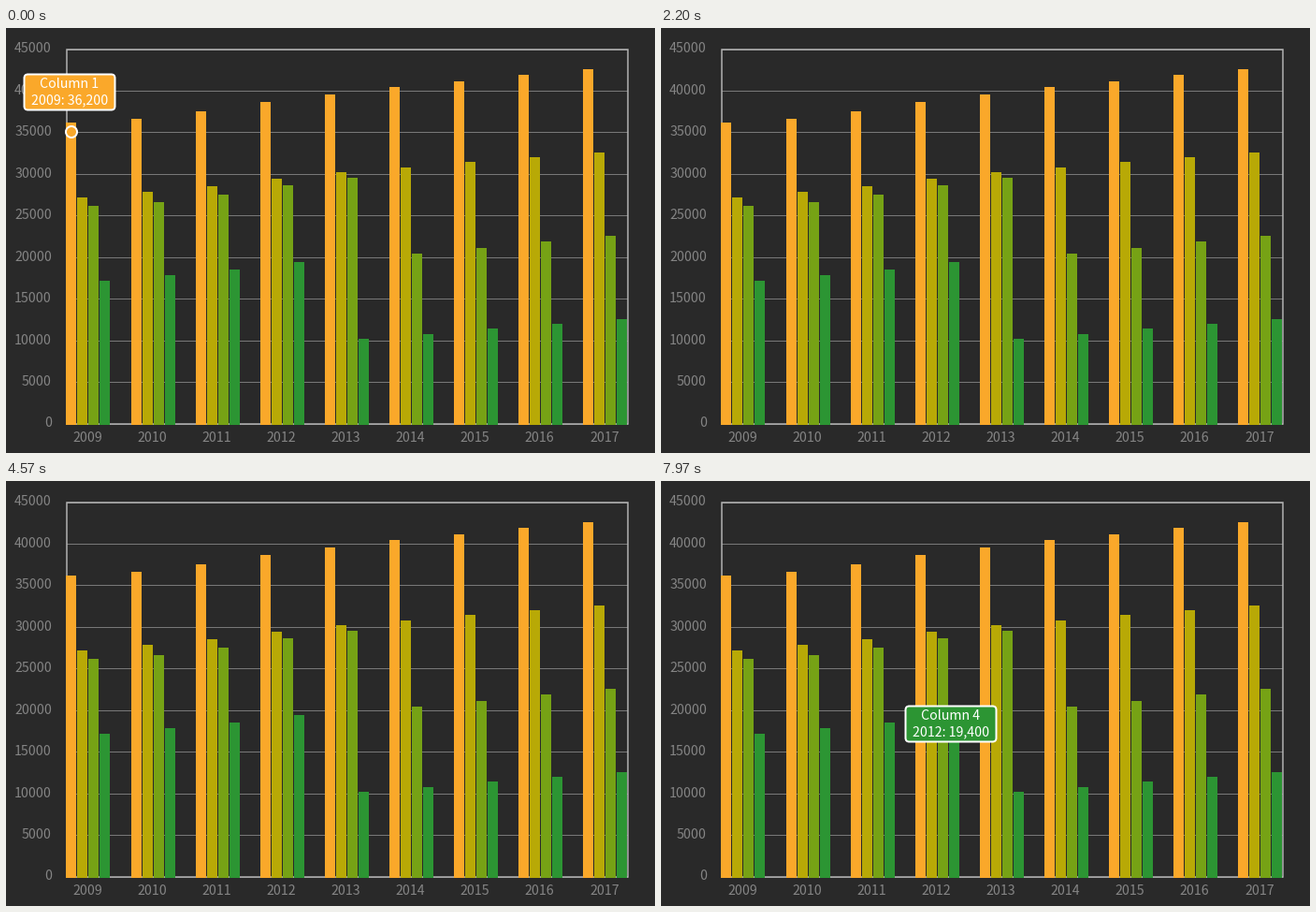
Recreate the animation shown at these times as a matplotlib script. Size 694x454 px, loop 8000 ms.

```python
import matplotlib.pyplot as plt
import numpy as np
from matplotlib.animation import FuncAnimation
from matplotlib.patches import Circle, FancyBboxPatch, Rectangle

W, H, DPI = 694, 454, 100
PX = 72 / DPI                      # points per pixel
FRAMES, INTERVAL = 250, 32

plt.rcParams["font.family"] = "Noto Sans CJK JP"
FONT = 14.2 * PX

LEFT, RIGHT, TOP, BOTTOM, Y_MAX = 65, 665, 23, 423, 45000
BAR_W, BAR_STEP, GROUP_STEP = 11, 12, 69
FIRST_YEAR, YEARS = 2009, 9
COLORS = ["#faa82a", "#b8a906", "#76a215", "#2c9533"]

# In hundreds: first value, and the year index from which 100 is lost
BASES = [362, 272, 262, 172]
DROPS = [YEARS, YEARS, 5, 4]

# Pointer moves: start ms, end ms, goal x, goal y; it rests in between
START = np.array([64, 106])
MOVES = [
    (300, 1200, 81, 182), (1200, 2000, 87, 225),
    (2030, 2210, 102, 250), (2210, 2450, 110, 290), (2450, 2900, 138, 230),
    (3600, 3870, 165, 247),
    (4070, 4150, 167, 251), (4150, 4300, 179, 274), (4300, 4570, 203, 289),
    (4900, 5200, 213, 298),
    (5650, 5675, 215, 298), (5675, 5870, 219, 287),
    (6500, 6830, 248, 284), (6830, 7260, 271, 282), (7260, 7500, 300, 293),
    (7800, 7960, 317, 297),
]


def value_of(c, i):
    if c % 2 == 0:
        growth = np.interp(i, [0, 1, 2, 3, 5, 8], [0, 4, 13, 24, 42, 64])
    else:
        growth = np.interp(i, [0, 2, 4, 8], [0, 13, 30, 54])
    return 100 * (BASES[c] + round(growth) - 100 * (i >= DROPS[c]))


def y_of(value):
    return BOTTOM - value * (BOTTOM - TOP) / Y_MAX


def bar_x(c, i):
    return LEFT + GROUP_STEP * i - (i == 0) + BAR_STEP * c


def pointer(t):
    pos = START
    for start, end, *goal in MOVES:
        k = np.clip((t - start) / (end - start), 0, 1)
        pos = pos + k * (np.array(goal) - pos)
    return pos


def bar_at(x, y):
    for i in range(YEARS):
        for c in range(len(COLORS)):
            if 0 <= x - bar_x(c, i) < BAR_STEP and y >= y_of(value_of(c, i)):
                return c, i
    return None


fig = plt.figure(figsize=(W / DPI, H / DPI), dpi=DPI, facecolor="#292929")
ax = fig.add_axes([0, 0, 1, 1])
ax.set(xlim=(0, W), ylim=(H, 0))
ax.axis("off")


def label(x, y, text, color, ha="center", z=2):
    return ax.text(x, y, text, color=color, fontsize=FONT, ha=ha,
                   va="baseline", zorder=z)


def block(x, y, w, h, color, z):
    ax.add_patch(Rectangle((x, y), w, h, fc=color, lw=0, zorder=z))


def draw_chart():
    for value in range(0, Y_MAX + 1, 5000):
        y = y_of(value)
        block(LEFT, int(y), RIGHT - LEFT, 1, "#787878", 1)
        label(49, y + 3.5, str(value), "#848484", "right")
    ax.add_patch(Rectangle((LEFT, TOP), RIGHT - LEFT, BOTTOM - TOP,
                           fill=False, ec="#b4b4b4", lw=1.5 * PX, zorder=1.5,
                           snap=False))
    for i in range(YEARS):
        label(87 + 69.1 * i, 442, str(FIRST_YEAR + i), "#848484")
        for c, color in enumerate(COLORS):
            top = int(y_of(value_of(c, i)))
            block(bar_x(c, i), top, BAR_W, BOTTOM + 1 - top, color, 3)


draw_chart()
marker = ax.add_patch(Circle((0, 0), 6, ec="white", lw=2 * PX, zorder=4))
box = ax.add_patch(FancyBboxPatch(
    (0, 0), 97, 38, boxstyle="round,pad=0,rounding_size=4",
    ec="white", lw=2 * PX, zorder=5, snap=False))
title = label(0, 0, "", "white", z=6)
detail = label(0, 0, "", "white", z=6)
tooltip = [marker, box, title, detail]


def update(frame):
    px, py = pointer((frame + .5) * INTERVAL)
    hit = bar_at(px, py)
    for artist in tooltip:
        artist.set_visible(hit is not None)
    if hit is None:
        return tooltip

    c, i = hit
    value = value_of(c, i)
    # The tooltip sits less far to the left near the chart's edge
    x = round(px - np.interp(px, [75, 135], [45, 56]))
    y = round(py - 57)

    marker.set_center((LEFT + 5 + GROUP_STEP * i + BAR_STEP * c,
                       round(y_of(value) + 10)))
    box.set_x(x + .5)
    box.set_y(y + .5)
    for patch in (marker, box):
        patch.set_facecolor(COLORS[c])
    title.set_position((x + 49, y + 15))
    title.set_text(f"Column {c + 1}")
    detail.set_position((x + 49, y + 32))
    detail.set_text(f"{FIRST_YEAR + i}: {value:,}")
    return tooltip


anim = FuncAnimation(fig, update, frames=FRAMES, interval=INTERVAL,
                     init_func=lambda: update(0), repeat=True, repeat_delay=0,
                     blit=False)
plt.show()
```
